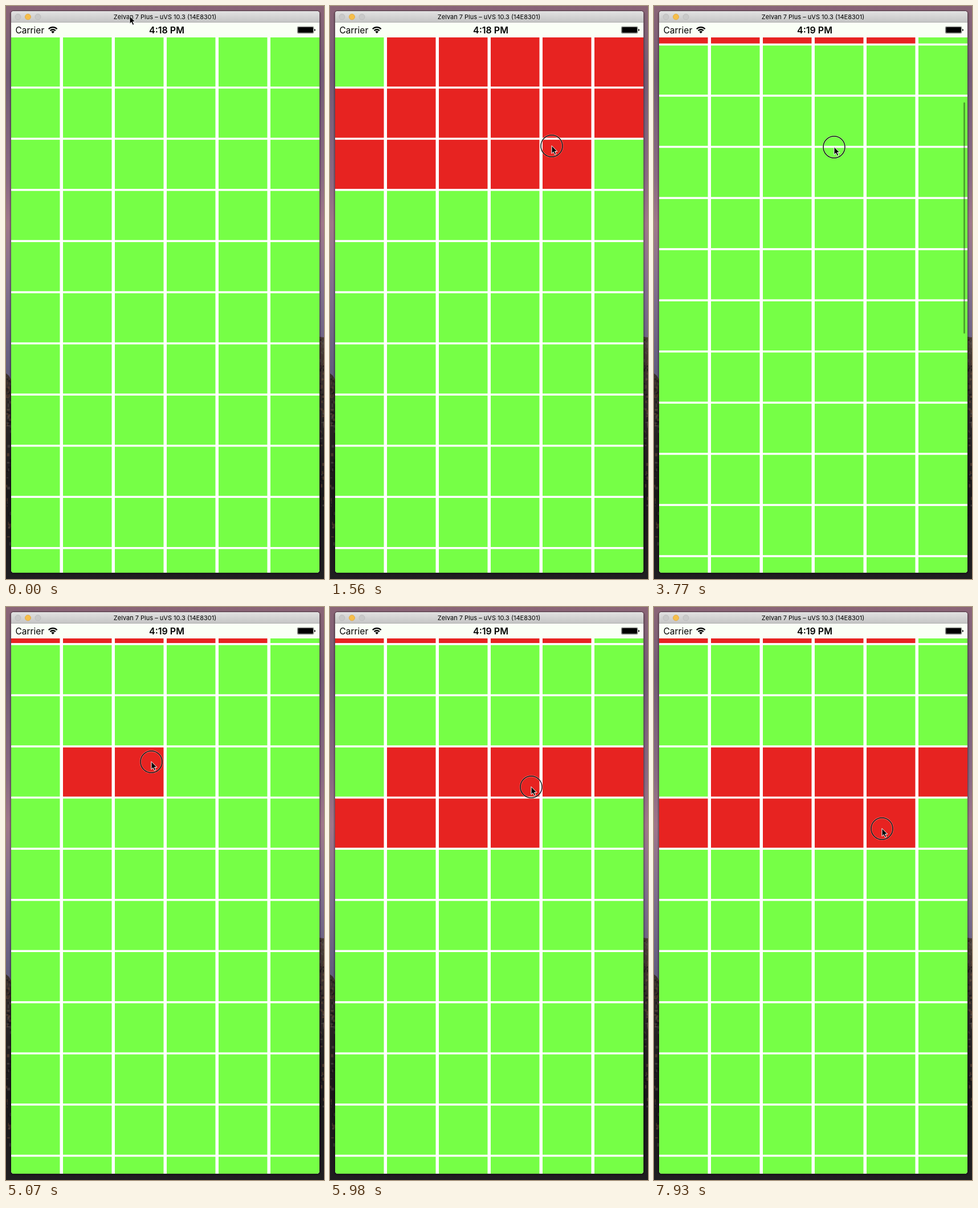
An HTML page that plays this animation: 558x1003 px, repeating every 8000 ms.

```html
<!DOCTYPE html>
<html lang="en">
<head>
<meta charset="utf-8">
<title>Grid selection</title>
<style>
  html, body { margin: 0; width: 100%; height: 100%; overflow: hidden; background: #222; }
  svg { display: block; width: 558px; height: 1003px; }
  text { font-family: Inter, Roboto, sans-serif; fill: #000; }
</style>
</head>
<body>
<svg viewBox="0 0 558 1003" xmlns="http://www.w3.org/2000/svg">
  <defs>
    <linearGradient id="sky" x2="0" y2="1">
      <stop offset="0" stop-color="#8b6577"/>
      <stop offset=".12" stop-color="#735b76"/>
      <stop offset=".3" stop-color="#8a6a83"/>
      <stop offset=".38" stop-color="#a0778a"/>
      <stop offset=".48" stop-color="#84708f"/>
      <stop offset=".64" stop-color="#625c7e"/>
    </linearGradient>
    <linearGradient id="rock" x2="0" y2="1">
      <stop offset="0" stop-color="#4b3c35"/>
      <stop offset=".3" stop-color="#2c2727"/>
      <stop offset=".65" stop-color="#191719"/>
      <stop offset="1" stop-color="#201e21"/>
    </linearGradient>
    <linearGradient id="bar" x2="0" y2="1">
      <stop offset="0" stop-color="#e2e2e2"/>
      <stop offset="1" stop-color="#c5c5c5"/>
    </linearGradient>
    <clipPath id="frame"><rect x="9" y="9" width="541" height="983" rx="4.5"/></clipPath>
    <clipPath id="view"><rect x="9" y="55" width="541" height="937"/></clipPath>
  </defs>

  <rect width="558" height="1003" fill="url(#sky)"/>
  <path d="M0 643L5 647 12 660 540 590 550 579 558 580V1003H0Z" fill="url(#rock)"/>
  <g id="stones"></g>
  <g fill="none" stroke="#000">
    <rect x="7.5" y="8.5" width="544" height="986" rx="6" stroke-width="3" opacity=".14"/>
    <rect x="8.5" y="8.5" width="542" height="984" rx="5" opacity=".22"/>
  </g>

  <g clip-path="url(#frame)">
    <rect x="9" y="9" width="541" height="983" fill="#fff"/>
    <g id="grid" clip-path="url(#view)"></g>
    <rect x="9" y="28" width="541" height="27" fill="#fafff6"/>
    <rect x="9" y="9" width="541" height="19" fill="url(#bar)"/>
    <rect x="9" y="28" width="541" height="1" fill="#b0b0b0"/>
    <g stroke-width=".8">
      <circle cx="21" cy="19" r="5" fill="#c9c9c9" stroke="#b9b9b9"/>
      <circle cx="38.5" cy="19" r="5" fill="#f6be4b" stroke="#dfa43a"/>
      <circle cx="56" cy="19" r="5" fill="#c9c9c9" stroke="#b9b9b9"/>
    </g>
    <text x="279" y="23.3" font-size="11" text-anchor="middle">Zelvan 7 Plus – uVS 10.3 (14E8301)</text>
    <text x="16.5" y="48" font-size="15.5">Carrier</text>
    <text id="clock" x="282" y="48" font-size="16" font-weight="600" text-anchor="middle"></text>
    <g fill="none" stroke="#000" stroke-width="2.3">
      <path d="M74.8 40.2a10.5 10.5 0 0 1 14.8 0"/>
      <path d="M77.6 43.1a6.6 6.6 0 0 1 9.2 0"/>
    </g>
    <path d="M82.2 48l-2.8-2.9a4 4 0 0 1 5.6 0z"/>
    <rect x="511.4" y="36.1" width="28.4" height="11.6" rx="1.6" fill="none" stroke="#555" stroke-width=".8"/>
    <rect x="512.3" y="37" width="26.6" height="9.8" rx=".8"/>
    <path d="M541 40.2q2 .3 2 1.8t-2 1.8z"/>
    <rect id="thumb" x="543" width="3" height="405" rx="1.5" fill="#000" fill-opacity=".35"/>
  </g>

  <g id="cursor">
    <g id="ring" fill="none">
      <circle r="19" stroke="#fff" stroke-width="2.8" stroke-opacity=".4"/>
      <circle r="19" stroke="#111" stroke-width="1.5"/>
    </g>
    <path d="M0 -.5V13.3L3.1 10.4 5.3 15.4 7.8 14.3 5.6 9.5H9.8Z" fill="#000" stroke="#fff" stroke-width="1"/>
  </g>
</svg>
<script>
const LOOP = 8000, STEP = 130;
const COLS = 6, ROWS = 16, PITCH_X = 91, PITCH_Y = 89.56, LEFT = 9, TOP = 55;
const GREEN = '#76ff46', RED = '#e72321';
const $ = id => document.getElementById(id);

function add(parent, tag, attrs) {
  const el = document.createElementNS('http://www.w3.org/2000/svg', tag);
  for (const k in attrs) el.setAttribute(k, attrs[k]);
  parent.appendChild(el);
  return el;
}

// Rough rock texture along the visible edges
let seed = 7;
const rnd = () => (seed = seed * 16807 % 2147483647) / 2147483647;
for (let i = 0; i < 150; i++) {
  const right = i % 2, y = (right ? 582 : 650) + rnd() * rnd() * 340;
  const w = 1 + rnd() * 4;
  add($('stones'), 'rect', {
    x: (right ? 550 : 0) + rnd() * 7, y, width: w, height: 1 + rnd() * 5,
    fill: ['#0e0d10', '#6a4b37', '#57504e'][i % 3], opacity: .5
  });
}

const cells = [];
for (let i = 0; i < COLS * ROWS; i++) {
  const col = i % COLS;
  cells.push(add($('grid'), 'rect', {
    x: LEFT + col * PITCH_X, y: TOP + Math.floor(i / COLS) * PITCH_Y,
    width: col === COLS - 1 ? 86 : 85.5, height: 86
  }));
}

// Pointer path: time, x, y
const path = [
  [0, 217, 18], [260, 205, 42], [520, 150, 100], [780, 142, 104], [910, 150, 105],
  [1170, 300, 130], [1300, 400, 175], [1430, 385, 240], [1560, 389, 245], [1950, 396, 250],
  [2210, 396, 250], [2860, 320, 480], [3120, 308, 512], [3250, 308, 512], [3510, 313, 390],
  [3770, 316, 247], [3900, 316, 244.5], [4160, 300, 250], [4550, 150, 280], [4810, 140, 285],
  [4940, 215, 278], [5070, 255, 271], [5330, 400, 290], [5590, 395, 355], [5850, 345, 348],
  [5980, 353, 315], [6240, 420, 285], [6500, 300, 270], [6760, 190, 240], [6890, 165, 185],
  [7020, 167, 155], [7280, 190, 200], [7540, 300, 290], [7670, 370, 350], [7800, 392, 382],
  [7930, 400, 388]
];
const scrollPath = [[3250, 0], [3380, 55], [3510, 116], [3770, 254.5], [3900, 257]];

function along(keys, t, n) {
  if (t <= keys[0][0]) return keys[0][n];
  for (let i = 1; i < keys.length; i++) {
    const a = keys[i - 1], b = keys[i];
    if (t <= b[0]) return a[n] + (b[n] - a[n]) * (t - a[0]) / (b[0] - a[0]);
  }
  return keys[keys.length - 1][n];
}

const clamp = v => Math.max(0, Math.min(1, v));
const within = (t, a, b) => t >= a && t < b;

function cellAt(t) {
  const col = Math.floor((along(path, t, 1) - LEFT) / PITCH_X);
  const row = Math.floor((along(path, t, 2) + 2 - TOP + along(scrollPath, t, 1)) / PITCH_Y);
  return row * COLS + col;
}

// Each drag selects every cell from its anchor to the pointer, one step late
const drags = [{ from: 780, to: 2080, anchor: 1 }, { from: 4810, to: LOOP, anchor: 31 }];

function draw(t) {
  const scroll = along(scrollPath, t, 1);
  const spans = drags.filter(d => t >= d.from).map(d => {
    const end = cellAt(Math.min(t, d.to) - STEP);
    return [Math.min(d.anchor, end), Math.max(d.anchor, end)];
  });
  cells.forEach((el, i) =>
    el.setAttribute('fill', spans.some(([a, b]) => i >= a && i <= b) ? RED : GREEN));
  $('grid').querySelectorAll('rect').forEach((el, i) =>
    el.setAttribute('y', TOP + Math.floor(i / COLS) * PITCH_Y - scroll));

  $('thumb').setAttribute('y', 58 + scroll * .434);
  $('thumb').setAttribute('opacity', t < 3380 ? 0 : clamp((4550 - t) / 300));
  $('clock').textContent = t < 2700 ? '4:18 PM' : '4:19 PM';
  $('cursor').setAttribute('transform', `translate(${along(path, t, 1)} ${along(path, t, 2)})`);
  const pressed = within(t, 650, 2080) || within(t, 3250, 3900) || t >= 4680;
  $('ring').setAttribute('visibility', pressed ? 'visible' : 'hidden');
}

const start = performance.now();
function tick() {
  const t = (performance.now() - start) % LOOP;
  draw(Math.floor(t / STEP) * STEP);
  requestAnimationFrame(tick);
}
tick();
</script>
</body>
</html>
```
